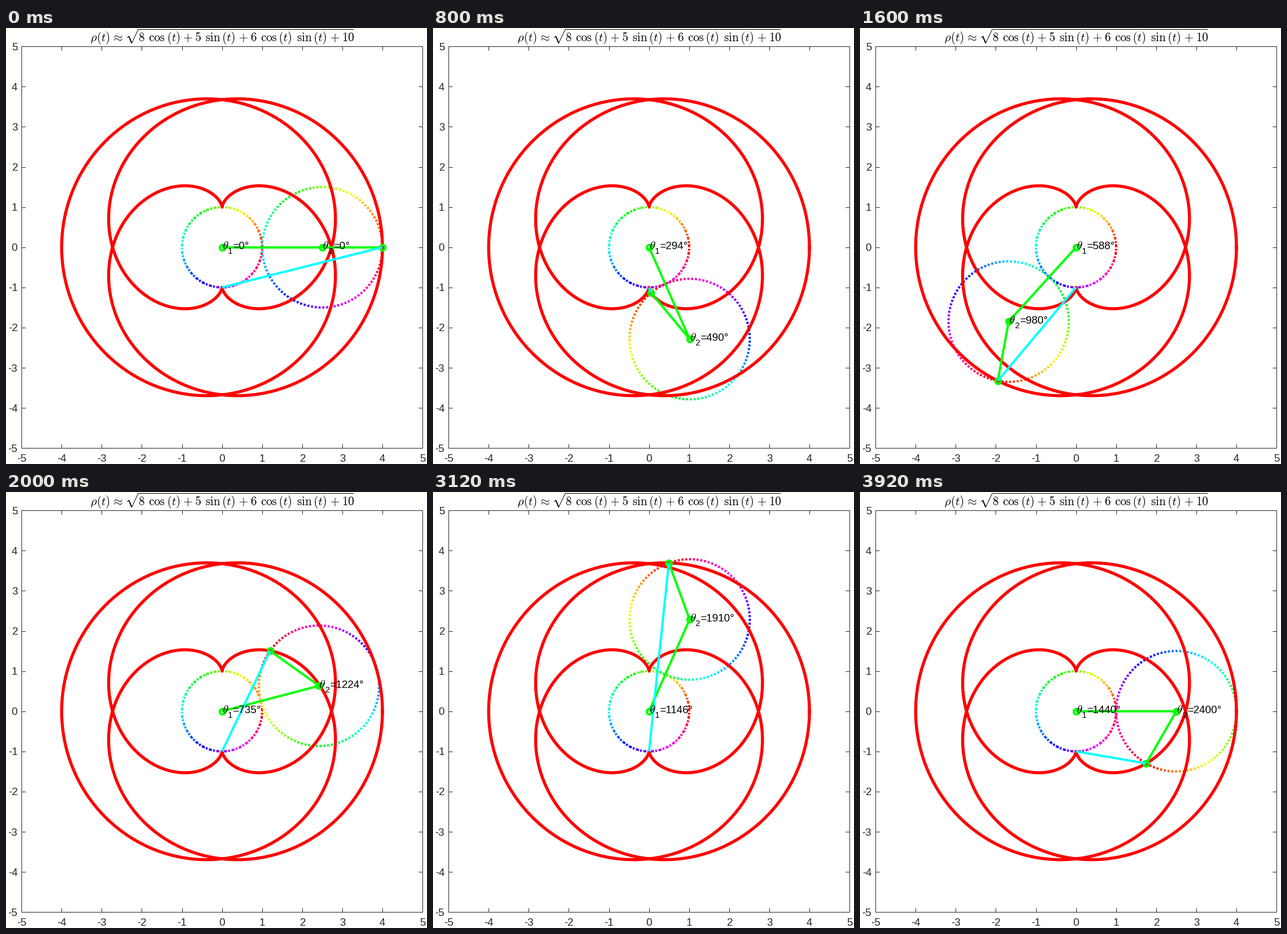
These frames come from a looping animation (736x761 px, 4000 ms). A matplotlib script:

```python
import numpy as np
import matplotlib.pyplot as plt
from matplotlib.animation import FuncAnimation
from matplotlib.collections import LineCollection
from matplotlib.colors import hsv_to_rgb
from matplotlib.lines import Line2D

W, H, DPI = 736, 761, 64
PT = 72 / DPI                      # points per pixel
LEFT, TOP, SIDE = 27.2, 32.2, 701  # plot box in pixels
UNIT = 10 / SIDE                   # data units per pixel
FRAMES, INTERVAL = 50, 80
ARM1, ARM2, RATIO = 2.5, 1.5, 5 / 3
TURNS = 4
INK = "#262626"
GREEN, CYAN, RED = "#00ff00", "#00ffff", "#ff0000"

plt.rcParams["font.family"] = "Liberation Sans"
plt.rcParams["mathtext.fontset"] = "cm"

fig = plt.figure(figsize=(W / DPI, H / DPI), dpi=DPI, facecolor="white")
ax = fig.add_axes([LEFT / W, 1 - (TOP + SIDE) / H, SIDE / W, SIDE / H])
ax.set(xlim=(-5, 5), ylim=(-5, 5))


def style_axes():
    ticks = range(-5, 6)
    names = [str(k) for k in ticks]
    ax.set_xticks(ticks, names)
    ax.set_yticks(ticks, names)
    ax.tick_params(direction="in", top=True, right=True, length=7 * PT,
                   width=PT, color=INK, labelcolor=INK,
                   labelsize=18.67 * PT)
    ax.tick_params(axis="x", pad=11 * PT)
    ax.tick_params(axis="y", pad=7 * PT)
    for spine in ax.spines.values():
        spine.set(linewidth=PT, edgecolor=INK)


def draw_title(x=147, baseline=23, em=21.1):
    """Set the formula piece by piece with TeX advances, in ems."""
    def func(name, width):
        return [(rf"\mathrm{{{name}}}", width + 0.167), ("(t)", 1.139)]

    cos, sin = func("cos", 1.338), func("sin", 1.228)
    plus = [("", 0.222), ("+", 1.0)]
    gap = [("", 0.333)]
    # Mathtext pads the relation sign by 0.2 em on its left.
    head = [(r"\rho", 0.517), ("(t)", 1.139 + 0.078), (r"\approx", 1.256)]
    body = ([("8", 0.5)] + gap + cos + plus + [("5", 0.5)] + gap + sin
            + plus + [("6", 0.5)] + gap + cos + gap + sin
            + plus + [("10", 1.0)])

    def run(x, pieces):
        for tex, advance in pieces:
            if tex:
                fig.text(x / W, 1 - baseline / H, f"${tex}$", ha="left",
                         va="baseline", fontsize=em * PT, color="black")
            x += advance * em
        return x

    def stroke(points, width):
        xs, ys = np.array(points).T
        fig.add_artist(Line2D(xs / W, 1 - ys / H, color="black",
                              lw=width * PT, solid_capstyle="butt",
                              solid_joinstyle="miter"))

    root = run(x, head)
    start = root + em
    end = run(start, body)
    stroke([(root + 1.5, 17), (root + 5, 14.3)], 1)
    stroke([(root + 4.6, 14.3), (root + 9.6, 26.5)], 2)
    stroke([(root + 9.4, 27), (start, 2.5), (end, 2.5)], 1)


def polar(radius, angle):
    return radius * np.cos(angle), radius * np.sin(angle)


def arm_tip(t):
    x1, y1 = polar(ARM1, t)
    x2, y2 = polar(ARM2, RATIO * t)
    return x1 + x2, y1 + y2


def dashes(periods, spans):
    """Start and end angles of each dash around a full turn."""
    base = np.arange(periods)[:, None, None]
    return ((base + np.array(spans)) * 2 * np.pi / periods).reshape(-1, 2)


def arcs(angles, radius, cx=0, cy=0, turn=0):
    steps = np.linspace(0, 1, 4)
    a = angles[:, :1] + (angles[:, 1:] - angles[:, :1]) * steps + turn
    x, y = polar(radius, a)
    return np.stack([x + cx, y + cy], axis=-1)


def rainbow_ring(angles, radius):
    hue = angles.mean(axis=1) / (2 * np.pi)
    colors = hsv_to_rgb(np.stack([hue, hue * 0 + 1, hue * 0 + 1], axis=-1))
    ring = LineCollection(arcs(angles, radius), colors=colors,
                          linewidths=4 * PT, capstyle="butt", zorder=2)
    return ax.add_collection(ring)


class AngleLabel:
    """Theta with a subscript and a value in degrees."""

    def __init__(self, index):
        def piece(text, size):
            return ax.text(0, 0, text, fontsize=size * PT, color="black",
                           ha="left", va="baseline", zorder=6)

        self.parts = [(piece(r"$\theta$", 20.5), 0, 3.5),
                      (piece(str(index), 15), 10, 11.5),
                      (piece("", 18.67), 18.8, 3.5)]

    def place(self, x, y, angle):
        for text, dx, dy in self.parts:
            text.set_position((x + dx * UNIT, y - dy * UNIT))
        self.parts[-1][0].set_text(f"={np.degrees(angle):.0f}°")


style_axes()
draw_title()

ax.plot(*arm_tip(np.linspace(0, 6 * np.pi, 1801)), color=RED,
        lw=5.33 * PT, zorder=3)
rainbow_ring(dashes(33, [(0, 0.4), (0.56, 0.8)]), 1)
wheel_angles = dashes(100, [(0, 0.55)])
wheel = rainbow_ring(wheel_angles, ARM2)
arms, = ax.plot([], [], color=GREEN, lw=4 * PT, marker="o", ms=9.5 * PT,
                mfc="none", mec=GREEN, mew=4 * PT, zorder=4,
                solid_capstyle="butt")
rod, = ax.plot([], [], color=CYAN, lw=4 * PT, zorder=5,
               solid_capstyle="butt")
label1, label2 = AngleLabel(1), AngleLabel(2)


def update(i):
    t = TURNS * 2 * np.pi * i / (FRAMES - 1)
    cx, cy = polar(ARM1, t)
    x, y = arm_tip(t)
    wheel.set_segments(arcs(wheel_angles, ARM2, cx, cy, RATIO * t))
    arms.set_data([0, cx, x], [0, cy, y])
    rod.set_data([0, x], [-1, y])
    label1.place(0, 0, t)
    label2.place(cx, cy, RATIO * t)
    return wheel, arms, rod


anim = FuncAnimation(fig, update, frames=FRAMES, interval=INTERVAL,
                     repeat=True, repeat_delay=0, blit=False)
plt.show()
```
